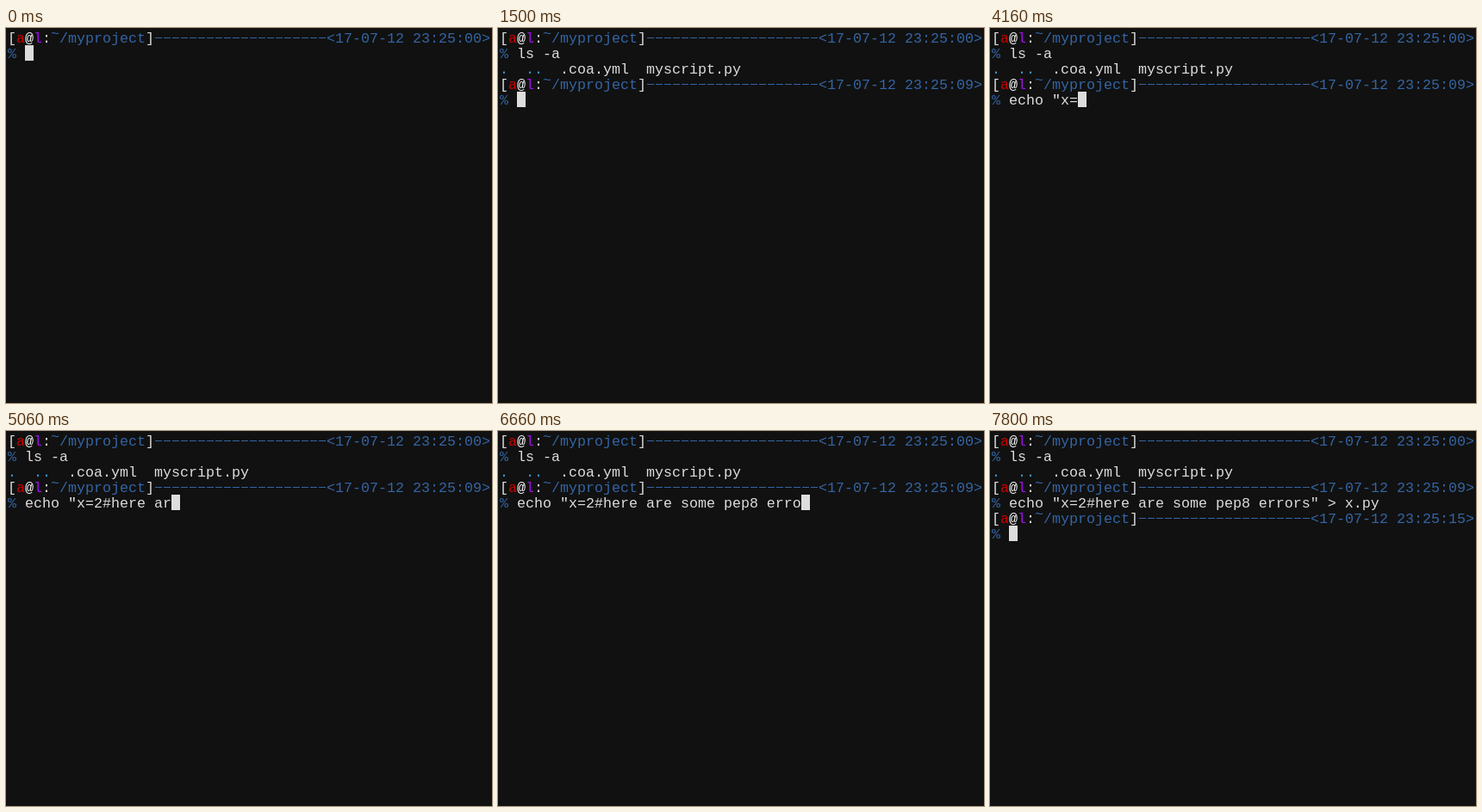
An HTML page that plays this animation: 564 px wide and 436 px high, repeating every 8000 ms.

```html
<!DOCTYPE html>
<html lang="en">
<head>
<meta charset="utf-8">
<title>Terminal session</title>
<style>
  html, body { margin: 0; width: 564px; height: 436px; overflow: hidden; background: #111; }
  svg { display: block; }
  text {
    font: 16.664px "Liberation Mono", "Noto Sans Mono", monospace;
    font-variant-ligatures: none;
    white-space: pre;
  }
</style>
</head>
<body>
<svg id="terminal" width="564" height="436" viewBox="0 0 564 436"></svg>
<script>
const LOOP = 8000, KEY = 100, REPLY = 40;
const CELL = 10, LINE = 18, PAD = 2, BASE = 15;
const WHITE = '#dddddd', BLUE = '#3465a4', RED = '#cc0000',
      PURPLE = '#a010e8', DIR = '#3f97d6';
const stage = document.getElementById('terminal');

function add(parent, tag, attrs) {
  const el = document.createElementNS('http://www.w3.org/2000/svg', tag);
  for (const name in attrs) el.setAttribute(name, attrs[name]);
  return parent.appendChild(el);
}

const colX = col => PAD + col * CELL;
const rowY = row => PAD + row * LINE;

function write(parent, row, col, str, fill, lift = 0) {
  const el = add(parent, 'text', { x: colX(col), y: rowY(row) + BASE - lift, fill });
  el.textContent = str;
  return el;
}

// Two-line prompt: status line, then the command line
function prompt(row, clock) {
  const g = add(stage, 'g', {});
  write(g, row, 0, '[', WHITE);
  write(g, row, 1, 'a', RED);
  write(g, row, 2, '@', '#ffffff');
  write(g, row, 3, 'l', PURPLE);
  write(g, row, 4, ':', WHITE);
  write(g, row, 5, '~', BLUE, 5);
  write(g, row, 6, '/myproject', BLUE);
  write(g, row, 16, ']', WHITE);
  add(g, 'path', {
    d: `M${colX(17) + 1} ${rowY(row) + 9.5}H${colX(37)}`,
    stroke: BLUE, 'stroke-dasharray': '8 2'
  });
  write(g, row, 37, '<17-07-12 ' + clock + '>', BLUE);
  write(g, row + 1, 0, '%', BLUE);
  return g;
}

function listing(row) {
  const g = add(stage, 'g', {});
  write(g, row, 0, '.', DIR);
  write(g, row, 3, '..', DIR);
  write(g, row, 7, '.coa.yml', WHITE);
  write(g, row, 17, 'myscript.py', WHITE);
  return g;
}

// nextRow is where the cursor waits once the command has finished
function command(row, nextRow, start, str) {
  const enter = start + str.length * KEY;
  return { row, nextRow, start, str, enter, done: enter + REPLY, el: write(stage, row, 2, '', WHITE) };
}

const list = command(1, 4, 960, 'ls -a');
const echo = command(4, 6, 3460, 'echo "x=2#here are some pep8 errors" > x.py');
prompt(0, '23:25:00');
const replies = [
  [list.done, listing(2)],
  [list.done, prompt(3, '23:25:09')],
  [echo.done, prompt(5, '23:25:15')]
];
const cursor = add(stage, 'rect', { width: CELL, height: LINE, fill: WHITE });

function draw(t) {
  let row = 1, col = 2;
  for (const c of [list, echo]) {
    const count = Math.max(0, Math.min(c.str.length, Math.floor((t - c.start) / KEY) + 1));
    c.el.textContent = c.str.slice(0, count);
    if (t >= c.done) {
      row = c.nextRow;
      col = 2;
    } else if (t >= c.enter) {
      row = c.row + 1;
      col = 0;
    } else if (count) {
      row = c.row;
      col = 2 + count;
    }
  }
  for (const [time, el] of replies) el.setAttribute('visibility', t >= time ? 'visible' : 'hidden');
  cursor.setAttribute('x', colX(col));
  cursor.setAttribute('y', rowY(row));
}

const began = performance.now();
function tick() {
  draw((performance.now() - began) % LOOP);
  requestAnimationFrame(tick);
}
tick();
</script>
</body>
</html>
```
